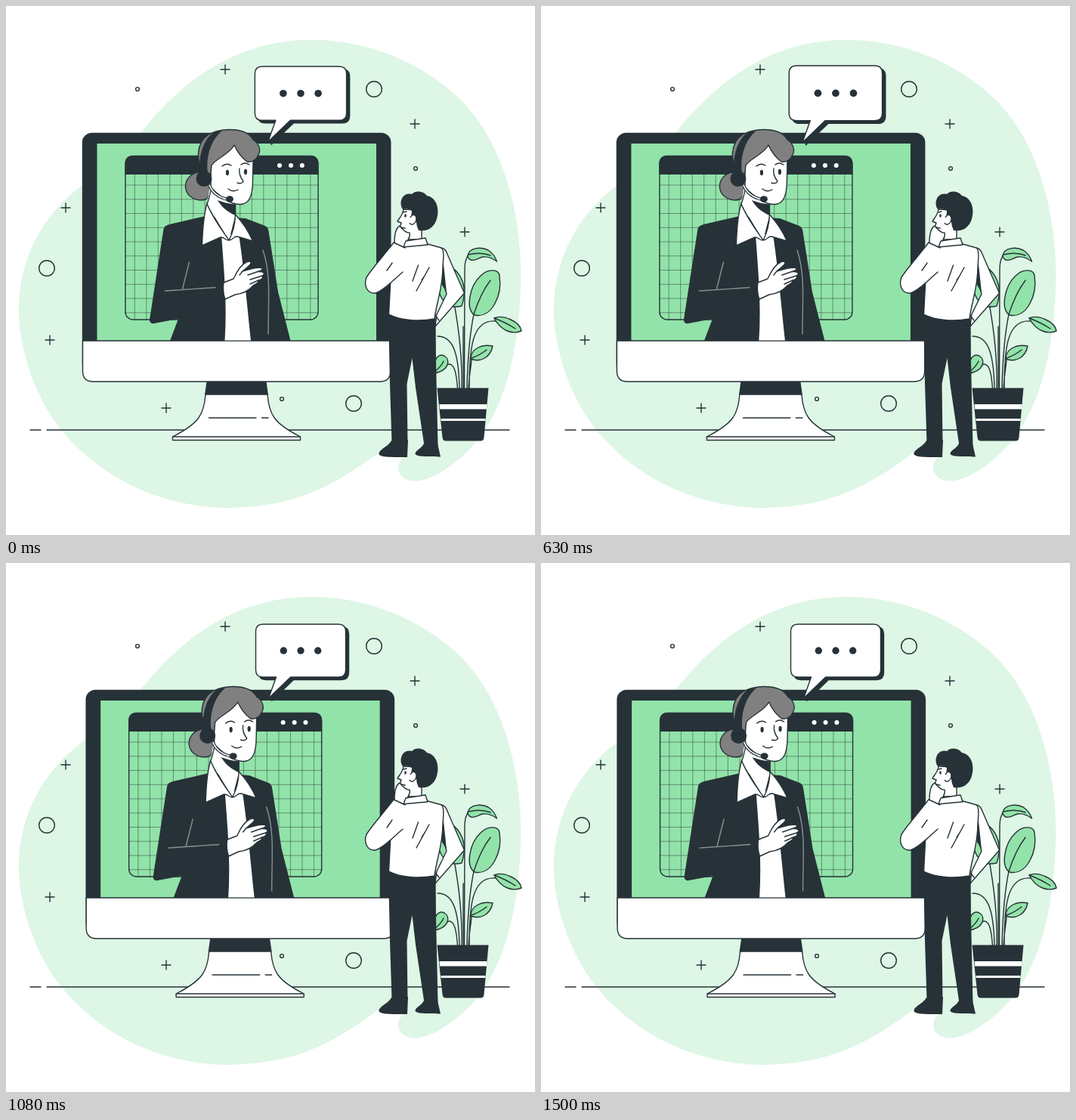
Animation, 700 px wide and 700 px high, one loop 1.54 s. Source, as an HTML page:

```html
<!DOCTYPE html>
<html lang="en">
<head>
<meta charset="utf-8">
<title>Online support</title>
<style>
  html, body { margin: 0; width: 100%; height: 100%; overflow: hidden; background: #fff; }
  svg { display: block; width: 100vw; height: 100vh; }
  .line { fill: none; stroke: #263238; stroke-width: 1.4; stroke-linecap: round; stroke-linejoin: round; }
  .dark { fill: #263238; }
  .plain { fill: #fff; }
  .white { fill: #fff; stroke: #263238; stroke-width: 1.4; stroke-linejoin: round; }
  .green { fill: #92e3a9; stroke: #263238; stroke-width: 1.4; stroke-linejoin: round; }
  .hair { fill: #808080; stroke: #263238; stroke-width: 1.4; stroke-linejoin: round; }
  .seam { fill: none; stroke: #8a8f92; stroke-width: 1.4; stroke-linecap: round; }
  .thin { stroke-width: .6; stroke-opacity: .8; }
</style>
</head>
<body>
<svg viewBox="0 0 700 700">
  <defs>
    <path id="balloon" d="M340 81H440Q449.500 81 449.500 90.500V141.500Q449.500 151 440 151H376.500L347.500 179L357.500 151H340Q330.500 151 330.500 141.500V90.500Q330.500 81 340 81Z"/>
  </defs>

  <path fill="#def6e5" d="M395 45C480 42 562 80 610 133C662 192 684 285 681 372C678 462 659 532 622 577C600 603 570 624 548 628C530 631 518 622 519 609C520 601 526 597 530 594L500 586C440 630 390 664 290 664C195 662 117 617 71 558C35 512 15 445 17 395C20 325 54 272 101 237C140 208 157 192 178 168C212 126 280 49 395 45Z"/>
  <path class="line" d="M32 561H46M54 561H666"/>
  <g id="marks" class="line"></g>

  <g id="monitor">
    <rect class="dark" x="100.800" y="167.800" width="408.700" height="320" rx="13"/>
    <path fill="#92e3a9" d="M120.500 182H490V443H120.500Z"/>
    <path class="white" d="M101.500 443H508.800V483Q508.800 497 494.500 497H115.500Q101.500 497 101.500 483Z"/>
    <path class="dark" d="M265.500 497H344.500L347 514.500H263Z"/>
    <path class="white" d="M264 514H346C348 540 354 552 389.500 570V574.500H220.500V570C256 552 262 540 264 514Z"/>
    <path class="line" d="M220.500 570H389.500M268.500 545H331M338.500 545H347"/>

    <rect class="line" x="158" y="198.500" width="255" height="216.500" rx="10"/>
    <path id="grid" class="line thin"/>
    <path class="dark" d="M157.500 223V209Q157.500 198 168 198H403Q413.500 198 413.500 209V223Z"/>
    <g fill="#fff"><circle cx="362" cy="211" r="3"/><circle cx="377" cy="211" r="3"/><circle cx="391.800" cy="211" r="3"/></g>

    <path class="dark" d="M264 278L216 289Q209 291 208.500 295L190 415Q190 421 196 420L228 414L217 443H376.500L360 378L347.500 298Q347 293 343 291L317 281Z"/>
    <path class="plain" d="M285 302H308C314 340 319 395 324 442.500H289.500C293 395 288 345 285 302Z"/>
    <path class="hair" d="M262 220C247 218 237 228 237.500 240C239 253 252 259 264 256Q270 252 272 238Z"/>
    <path class="plain" d="M271 232L266 262L295 310L303.500 277V255Z"/>
    <path class="line" d="M272 238Q270 252 266 262M303.500 260V277"/>
    <path class="white" d="M271 205V240C280 249 290 257 299 260.500C306 263 313 263.500 318 260C325 255 326.500 244 326.500 231L327 206L301 183L276 195Z"/>
    <path class="dark" d="M280 257C288 260 296 262 304 262.500L303.500 277C294 273 286 267 280 257Z"/>
    <path class="hair" d="M263 222C250 204 252 181 268 170C287 160 319 161 327 177C334 181 338 190 334 197C331 204 326 207 319 206C311 200 306 193 302 184C296 196 276 203 272 211L270 230Z"/>
    <path class="dark" d="M257 222C253 195 265 171 277 166L286 165C271 177 264 200 267 221Z"/>
    <circle class="dark" cx="262" cy="228.500" r="10.500"/>
    <path d="M269 237C274 249 283 254 294 256" fill="none" stroke="#263238" stroke-width="4.200"/>
    <path d="M269 237C274 249 283 254 294 256" fill="none" stroke="#fff" stroke-width="1.800"/>
    <ellipse class="dark" cx="296" cy="255.500" rx="5" ry="4.200"/>
    <ellipse class="dark" cx="293" cy="220.500" rx="2.100" ry="3.700"/>
    <ellipse class="dark" cx="317" cy="219.500" rx="2.100" ry="3.700"/>
    <path class="line" d="M286 212Q292 207 298 211M311 210Q316 206 322 210M309 215C308 221 311 228 314 232Q312 236 306 234M294 242Q300 247 307 243"/>
    <path class="white" d="M266 261.500C261 278 260 300 259.500 317L284 306C290 306 289 310 295 310C285 295 273 280 266 261.500ZM303.500 276Q303 295 295 310C302 309 300 305 306 305L326.500 311C320 296 312 285 303.500 276Z"/>
    <path class="seam" d="M210.500 377L277 372.500M233.500 374.500L242.500 339M340 323C351 355 347 390 347 434"/>
    <path class="white" d="M288 366L301 361C306 350 313 341 319 338.500C326 337 325 341 320 345L313 351C321 349 330 345 338 346.500C341 348 338 350 333 351.500C341 351 344 354 339 357C341 360 338 362 334 363C335 366 331 368 327 370C321 377 312 381 303 382L290 388C287 380 287 373 288 366Z"/>
    <path class="line" d="M333 351.500L320 356M339 357L323 362M334 363L323 368M313 351L309 356"/>
  </g>

  <g id="bubble">
    <use href="#balloon" x="4" y="3.500" fill="#263238" stroke="#263238" stroke-width="1.400"/>
    <use href="#balloon" class="white"/>
    <circle class="dark" cx="367.300" cy="116" r="4.700"/><circle class="dark" cx="390" cy="116" r="4.700"/><circle class="dark" cx="412.700" cy="116" r="4.700"/>
  </g>

  <g id="plant">
    <path class="line" stroke-width="1.200" d="M603 506C604 465 600 430 592 388M606.500 506L607 348Q607 336 612 329M610 506C611 462 614 432 619 408M613 506C613 455 616 414 648 417M612 506C613 485 616 475 616 467M600 506C599 455 590 437 571 437M597.500 506C596 485 593 470 583 475M605 506V424"/>
    <path class="green" d="M611 330C613 320 628 318 638 323Q646 328 649.500 338Q640 331 631 332C625 333 621 338 615 336Q611 334 611 330Z"/>
    <path class="green" d="M620 409C608 401 613 371 628 357C638 347 652 348 653 357C657 382 643 414 620 409Z"/>
    <path class="green" d="M646 413C657 408 680 417 682 430C670 435 655 430 646 413Z"/>
    <path class="green" d="M615 467C615 454 629 447 644 450C641 465 628 472 615 467Z"/>
    <path class="green" d="M565 486C565 468 572 459 580 463C589 468 586 484 565 486Z"/>
    <path class="green" d="M574 340C598 344 613 366 603 397C584 402 573 388 572 370Z"/>
    <path class="line" d="M612 329Q628 325 641 330M619 408Q628 380 641 363M646 413Q662 419 674 427M616 466Q627 462 636 455M566 485Q576 477 579 470"/>
    <path class="dark" d="M570.500 505.500H638.500L632.500 571Q632 575.500 628 575.500H582Q578 575.500 577.500 571Z"/>
    <path class="plain" d="M573.500 527H636.500L636 533.500H574ZM575.500 546H634.500V549H575.700Z"/>
  </g>

  <g id="man">
    <path class="dark" d="M510 575C506 583 493 587 493.500 593C495 597 508 597 531 597L532 574ZM553 579C550 586 541 588 541.500 593C545 597 560 596 575 596.500L571 579Z"/>
    <path class="dark" d="M506 407H568.500L569 470L571.500 582H553.500L542 505L537.500 466L530.500 500L531.500 578H510.500L508 500Z"/>
    <path class="white" d="M576 320C582 321 583 326 586 333L606.500 380L568 424L570 408L583 381L575 354Z"/>
    <path class="dark" d="M577 323L583 379L575 366L574 345Z"/>
    <path class="white" d="M526 317L558 315L576 320C580 323 579 332 578 345C578 374 570 390 567 414C545 418 522 416 506.500 408L510 341L515 318Z"/>
    <path class="white" d="M526 269C525 277 520 281 518 285L523 287L521.500 292L524 300C527 304 532 303 532 309L550 309L550 291L545 270Z"/>
    <path class="white" d="M521 291C515 294 514 305 514 314L526 320C529 312 536 307 534 300C530 301 526 297 521 291Z"/>
    <path class="plain" d="M513 313L528 320L525 352C513 362 501 376 489 380C478 381 473 370 477 359C486 345 501 329 513 313Z"/>
    <path class="line" d="M528 320L513 313C501 329 486 345 477 359C473 370 478 381 489 380C501 376 513 362 525 352"/>
    <path class="white" d="M529 311L555 307L558 316L526 319Z"/>
    <path class="dark" d="M525 269C519 261 524 246 537 249C542 243 553 245 557 251C568 253 573 265 571 277C569 291 560 299 546 297Q543 291 543 286L536 282L537 271Q531 267 525 269Z"/>
    <path class="white" d="M535 280C538 274 543 276 543 282C542 289 536 291 534 287"/>
    <ellipse class="dark" cx="528.500" cy="277.500" rx="1.300" ry="2.300"/>
    <path class="line" d="M526 273L530 272M523 293L528 294M504 350L511 340M545.500 343L538 364M560 346L543 377M550 363L554 357M569 411L573 416"/>
  </g>
</svg>
<script>
const $ = id => document.getElementById(id);

// Background crosses and rings
const crosses = [[290, 84], [541, 156], [79, 267], [607, 299], [58, 442], [212, 532]];
const rings = [[487, 110, 10.3], [54, 347, 10.3], [460, 526, 10.3], [174, 110, 2.4], [542, 215, 2.4], [365, 520, 2.4]];
$('marks').innerHTML =
  crosses.map(([x, y]) => `<path d="M${x - 6} ${y}h12M${x} ${y - 6}v12"/>`).join('') +
  rings.map(([x, y, r]) => `<circle cx="${x}" cy="${y}" r="${r}"/>`).join('');

let grid = '';
for (let x = 170.3; x < 413; x += 15.5) grid += `M${x} 223V415`;
for (let y = 237; y < 415; y += 18.75) grid += `M158 ${y}H413`;
$('grid').setAttribute('d', grid);

// Keys are [time in ms, value]
const LOOP = 1540, STEP = 1000 / 24;
const shake = [[0, 0], [465, 0], [615, -1.4], [755, 2.8], [935, -5.6], [1070, 5.6], [1228, -5.6], [1410, 5.6], [1577, -5.6]];
const beat = [[-28, 1], [122, 1.1], [422, 1], [572, 1], [717, 1.1], [850, 1], [1600, 1]];

function track(keys, t) {
  const i = keys.findIndex(k => k[0] > t);
  const [t0, a] = keys[i - 1], [t1, b] = keys[i];
  return a + (b - a) * (t - t0) / (t1 - t0);
}

function draw(ms) {
  // 24 poses per second
  const t = Math.floor((ms % LOOP + 3) / STEP) * STEP;
  $('monitor').setAttribute('transform', `translate(${track(shake, t)} 0)`);
  $('bubble').setAttribute('transform', `translate(392 133) scale(${track(beat, t)}) translate(-392 -133)`);
}

const start = performance.now();
function tick() {
  draw(performance.now() - start);
  requestAnimationFrame(tick);
}
tick();
</script>
</body>
</html>
```
